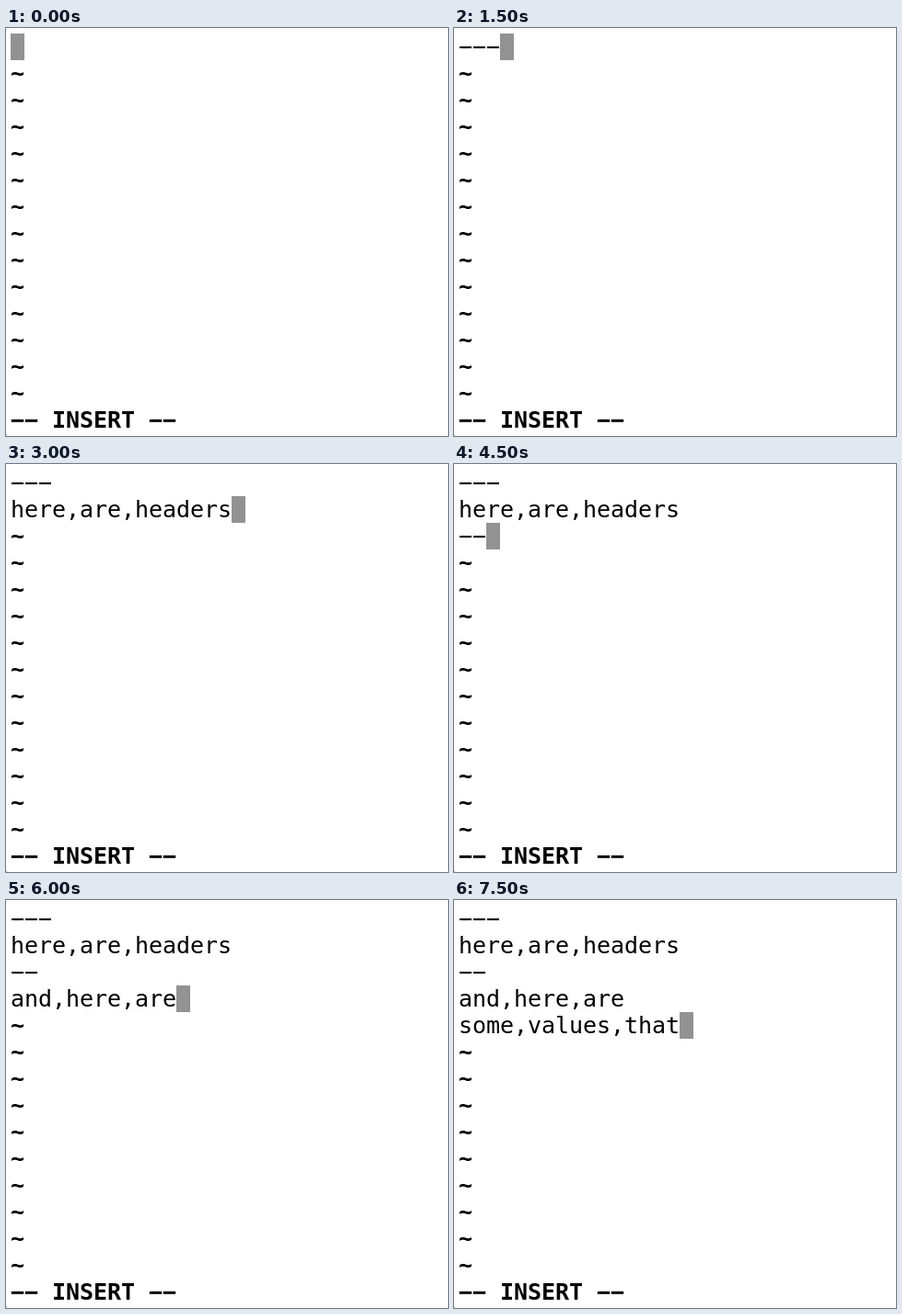
An HTML page for the animation above (8000 ms loop, 480 by 444 pixels).

```html
<!DOCTYPE html>
<html lang="en">
<head>
<meta charset="utf-8">
<title>Editor</title>
<style>
  html, body { margin: 0; width: 100%; height: 100%; overflow: hidden; background: #fff; }
  #stage { position: relative; width: 480px; height: 444px; overflow: hidden; background: #fff; color: #000; }
  #screen {
    position: absolute; left: 5px; top: 6px; margin: 0;
    font: 25px/29px "DejaVu Sans Mono", monospace;
    letter-spacing: -0.05px; white-space: pre; font-variant-ligatures: none;
  }
  #screen div { height: 29px; }
  .bold { font-weight: bold; }
  #cursor { position: absolute; width: 15px; height: 29px; background: #929292; }
  #corner { position: absolute; left: 0; top: 442px; width: 1px; height: 2px; background: #c8c8c8; }
</style>
</head>
<body>
<div id="stage">
  <div id="cursor"></div>
  <div id="screen"></div>
  <div id="corner"></div>
</div>
<script>
  const ROWS = 14, CELL_W = 15, CELL_H = 29, LEFT = 5, TOP = 6;
  const STEP = 1500, LOOP = 8000;
  // The wide minus sign has the shape of the terminal's dash.
  const lines = ["−−−", "here,are,headers", "−−", "and,here,are", "some,values,that"];

  const screen = document.getElementById("screen");
  const cursor = document.getElementById("cursor");

  const rows = Array.from({ length: ROWS + 1 }, () => screen.appendChild(document.createElement("div")));
  rows[ROWS].textContent = "−− INSERT −−";
  rows[ROWS].className = "bold";

  function show(count) {
    const current = Math.max(count - 1, 0);
    for (let i = 0; i < ROWS; i++) {
      const filler = i > current;
      rows[i].textContent = filler ? "~" : i < count ? lines[i] : "";
      rows[i].className = filler ? "bold" : "";
    }
    const column = count ? lines[current].length : 0;
    cursor.style.left = LEFT + column * CELL_W + "px";
    cursor.style.top = TOP + current * CELL_H + "px";
  }

  let shown = -1;
  function tick() {
    const count = Math.floor((performance.now() % LOOP) / STEP);
    if (count !== shown) show(shown = count);
    requestAnimationFrame(tick);
  }
  tick();
</script>
</body>
</html>
```
